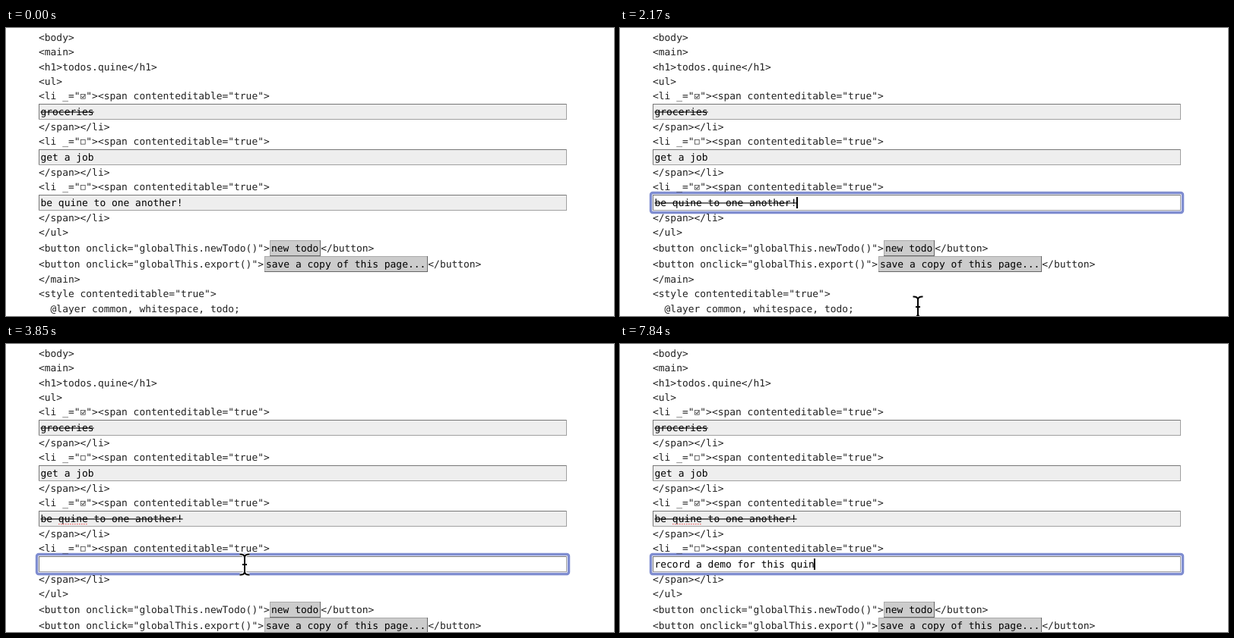
Animation, 800 px wide and 380 px high, one loop 8000 ms. Source, as an HTML page with a canvas:

```html
<!DOCTYPE html>
<html lang="en">
<head>
<meta charset="utf-8">
<title>todos.quine</title>
<style>
  html, body { margin: 0; width: 100%; height: 100%; overflow: hidden; background: #fff; }
  canvas { display: block; }
</style>
</head>
<body>
<canvas width="800" height="380"></canvas>
<script>
const ctx = document.querySelector('canvas').getContext('2d');
const LOOP = 8000, STEP = 70;
const LEFT = 43, CHAR = 7.796, ROW = 60;
const CHECKED = 1050, FOCUSED = 1890, ADDED = 2940;

const TYPED = 'record a demo for this quin';
// Runs of keystrokes, one per step: [start, count]
const RUNS = [[5180, 1], [5320, 2], [5530, 3], [5810, 4], [6160, 5], [6580, 8],
  [7210, 1], [7350, 1], [7630, 1], [7840, 1]];
// Pointer stops: [time, x, y]
const PATH = [[70, 300, 400], [770, 98, 210], [1050, 98, 210], [1540, 392, 232],
  [1890, 392, 232], [2170, 392, 368], [2450, 392, 368], [2800, 389, 286],
  [3290, 389, 286], [3850, 314, 291]];

const ARROW = new Path2D('M1 2V27L6.5 22L10.7 31.5L14.7 29.7L10.7 20.3H18.5Z');
const BEAM = new Path2D('M-6.5-13.5Q0-14 0-9Q0-14 6.5-13.5M0-9V9M-6.5 13.5Q0 14 0 9Q0 14 6.5 13.5M-3 0H3');

const clamp = v => Math.max(0, Math.min(1, v));
const typedCount = t => RUNS.reduce((sum, [start, count]) =>
  sum + Math.max(0, Math.min(count, Math.floor((t - start) / STEP) + 1)), 0);

function text(str, x, y, color = '#222') {
  ctx.fillStyle = color;
  ctx.fillText(str, x, y);
}

function rect(x, y, w, h, color) {
  ctx.fillStyle = color;
  ctx.fillRect(x, y, w, h);
}

function line(points, color, width) {
  ctx.strokeStyle = color;
  ctx.lineWidth = width;
  ctx.beginPath();
  points.forEach(p => ctx.lineTo(...p));
  ctx.stroke();
}

function bevel(x, y, w, h, fill, topLeft, bottomRight) {
  rect(x, y, w, h, bottomRight);
  rect(x, y, w - 1, h - 1, topLeft);
  rect(x + 1, y + 1, w - 2, h - 2, fill);
}

function item(index, label, { done, focus, caret = 0, misspelt }) {
  const y = 100 + index * ROW;
  if (focus) {
    ctx.strokeStyle = '#7f8dd0';
    ctx.lineWidth = 3.4;
    ctx.beginPath();
    ctx.roundRect(LEFT - 2.5, y - 2.5, 700, 26, 2.5);
    ctx.stroke();
  }
  text('<li _=" "><span contenteditable="true">', LEFT, y - 6);
  ctx.strokeStyle = '#444';
  ctx.lineWidth = 0.8;
  ctx.strokeRect(98.5, y - 12.5, 5.7, 5.7);
  if (done) line([[99.7, y - 9.6], [101.2, y - 7.8], [103.6, y - 11.6]], '#222', 1);

  bevel(LEFT, y, 695, 21, focus ? '#fff' : '#eee', '#777', '#a0a0a0');
  text(label, 45.5, y + 15, '#000');
  const end = 45.5 + label.length * CHAR;
  if (done) rect(45.5, y + 10.4, end - 45.5, 1.1, '#000');
  if (misspelt) for (let x = 69; x < 107; x += 3) rect(x, y + 17, 1.6, 1.2, '#e66');
  if (caret) rect(Math.round(end - 0.7), y + 3, 2, 15, `rgba(0,0,0,${caret})`);
  text('</span></li>', LEFT, y + 35);
}

function button(handler, label, y) {
  const open = `<button onclick="globalThis.${handler}()">`;
  const x = Math.round(LEFT + 0.4 + open.length * CHAR);
  const w = Math.round(label.length * CHAR + 4.6);
  text(open, LEFT, y);
  bevel(x, y - 15, w, 21, '#ccc', '#aaa', '#666');
  text(label, x + 2, y, '#000');
  text('</button>', x + w + 0.3, y);
}

function caretAlpha(t) {
  if (typedCount(t)) return 1;
  if (t < 4130) return clamp((3850 - t) / 210);
  const p = (t - 4130) % 840;
  return p < 420 ? clamp(p / 210) : clamp(1 - (p - 420) / 210);
}

function pointer(t) {
  if (t < PATH[0][0] || typedCount(t)) return;
  const next = PATH.findIndex(stop => stop[0] > t);
  const [t1, x1, y1] = PATH.at(next);
  const [t0, x0, y0] = next < 0 ? PATH.at(-1) : PATH[next - 1];
  const k = t1 > t0 ? (t - t0) / (t1 - t0) : 0;
  const e = k * k * (3 - 2 * k);
  const isArrow = t < 1120 || (t >= 2660 && t < 3360);

  ctx.save();
  ctx.translate(x0 + (x1 - x0) * e, y0 + (y1 - y0) * e);
  ctx.lineJoin = 'round';
  ctx.strokeStyle = '#fff';
  if (isArrow) {
    ctx.save();
    ctx.shadowColor = 'rgba(0,0,0,0.35)';
    ctx.shadowBlur = 3;
    ctx.shadowOffsetY = 1.5;
    ctx.lineWidth = 3.4;
    ctx.stroke(ARROW);
    ctx.restore();
    ctx.fillStyle = '#000';
    ctx.fill(ARROW);
  } else {
    ctx.lineWidth = 4.5;
    ctx.stroke(BEAM);
    ctx.strokeStyle = '#000';
    ctx.lineWidth = 2;
    ctx.stroke(BEAM);
  }
  ctx.restore();
}

function draw(t) {
  const added = t >= ADDED;
  const focused = t >= FOCUSED && !added;
  rect(0, 0, 800, 380, '#fff');
  ctx.font = '12.95px "DejaVu Sans Mono", monospace';
  ctx.textRendering = 'geometricPrecision';

  ['<body>', '<main>', '<h1>todos.quine</h1>', '<ul>'].forEach((tag, i) =>
    text(tag, LEFT, 17 + i * 19.25));
  item(0, 'groceries', { done: true });
  item(1, 'get a job', {});
  item(2, 'be quine to one another!',
    { done: t >= CHECKED, focus: focused, caret: focused ? 1 : 0, misspelt: added });
  if (added) item(3, TYPED.slice(0, typedCount(t)), { focus: true, caret: caretAlpha(t) });

  const y = added ? ROW : 0;
  text('</ul>', LEFT, y + 274);
  button('newTodo', 'new todo', y + 295);
  button('export', 'save a copy of this page...', y + 316);
  text('</main>', LEFT, y + 336);
  text('<style contenteditable="true">', LEFT, y + 355);
  text('  @layer common, whitespace, todo;', LEFT, y + 375);
  pointer(t);
}

const start = performance.now();
function tick() {
  const t = (performance.now() - start) % LOOP;
  draw(Math.floor(t / STEP) * STEP);
  requestAnimationFrame(tick);
}
tick();
</script>
</body>
</html>
```
